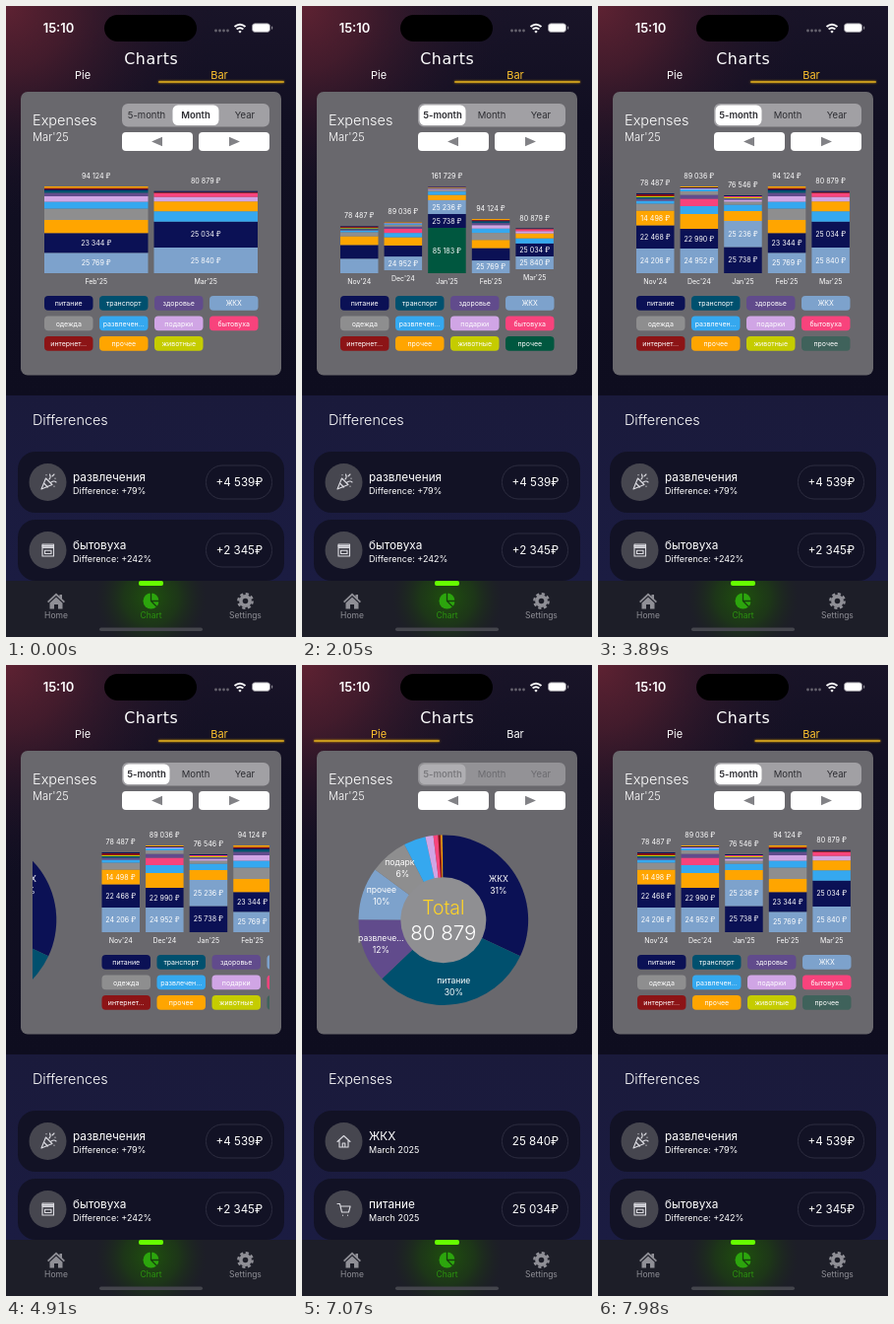
Animation of 295 by 640 pixels, one loop 8000 ms. Source, as an HTML page:

```html
<!DOCTYPE html>
<html lang="en">
<head>
<meta charset="utf-8">
<title>Charts</title>
<style>
  html, body { margin: 0; width: 100%; height: 100%; overflow: hidden; background: #110f22; }
  svg { display: block; width: 100%; height: 100%; }
  text { font-family: Inter, Roboto, sans-serif; fill: #fff; text-anchor: middle; }
  .start { text-anchor: start; }
  .wide { font-family: "DejaVu Sans", Inter, sans-serif; letter-spacing: .6px; }
  .light { font-weight: 300; }
  .line { fill: none; stroke: #dcdce2; stroke-width: 1.1; stroke-linecap: round; stroke-linejoin: round; }
</style>
</head>
<body>
<svg id="stage" viewBox="0 0 295 640">
  <defs>
    <linearGradient id="night" x1="0" y1="0" x2="0" y2="1">
      <stop offset="0" stop-color="#191428"/>
      <stop offset=".3" stop-color="#110f22"/>
      <stop offset="1" stop-color="#0e0d1f"/>
    </linearGradient>
    <radialGradient id="red" gradientUnits="userSpaceOnUse" cx="0" cy="0" r="215">
      <stop offset="0" stop-color="#5e2232"/>
      <stop offset=".3" stop-color="#4a1d2d" stop-opacity=".85"/>
      <stop offset=".6" stop-color="#331829" stop-opacity=".5"/>
      <stop offset="1" stop-color="#1a1226" stop-opacity="0"/>
    </radialGradient>
    <radialGradient id="glow" gradientUnits="userSpaceOnUse" cx="147.5" cy="600" r="56">
      <stop offset="0" stop-color="#1f5a08" stop-opacity=".85"/>
      <stop offset=".5" stop-color="#1d460e" stop-opacity=".6"/>
      <stop offset="1" stop-color="#1d2a18" stop-opacity="0"/>
    </radialGradient>
    <linearGradient id="panel" x1="0" y1="0" x2="0" y2="1">
      <stop offset="0" stop-color="#1a1a3b"/>
      <stop offset="1" stop-color="#1b1c42"/>
    </linearGradient>
    <filter id="blur" x="-10%" y="-400%" width="120%" height="900%"><feGaussianBlur stdDeviation="1.2"/></filter>
    <clipPath id="view"><rect x="27" y="150" width="241" height="220"/></clipPath>
  </defs>

  <rect width="295" height="640" fill="#110f22"/>
  <rect width="295" height="395" fill="url(#night)"/>
  <rect width="295" height="220" fill="url(#red)"/>

  <!-- status bar -->
  <rect x="100" y="9" width="94" height="27" rx="13.5"/>
  <g fill="#66636e">
    <circle cx="213.5" cy="25" r="1.4"/><circle cx="217.5" cy="25" r="1.4"/>
    <circle cx="221.5" cy="25" r="1.4"/><circle cx="225.5" cy="25" r="1.4"/>
  </g>
  <g fill="none" stroke="#fff" stroke-width="1.9">
    <path d="M232.5 21q5.5-4.6 11 0M234.6 23.6q3.4-2.7 6.8 0"/>
    <path d="M238 27.2l-1.2-1.4q1.2-.9 2.4 0z" fill="#fff" stroke-width=".8"/>
  </g>
  <rect x="250.5" y="17.8" width="18" height="8.6" rx="2.8" fill="#fff" stroke="#8d8b94" stroke-width=".8"/>
  <rect x="270" y="20.5" width="1.2" height="3.2" rx=".6" fill="#8d8b94"/>

  <g id="underline">
    <rect y="76" width="128" height="2" rx="1" fill="#b98500" filter="url(#blur)"/>
    <rect y="76.3" width="128" height="1.5" rx=".7" fill="#e0ae22"/>
  </g>

  <!-- chart card -->
  <rect x="15" y="87" width="265" height="287.5" rx="7" fill="#69686d"/>
  <g id="segmented">
    <rect x="118" y="99" width="150" height="23.5" rx="6" fill="#a1a0a4"/>
    <rect id="thumb" y="100.5" width="47" height="20.5" rx="5.5" fill="#fff"/>
    <g id="choices"></g>
  </g>
  <g fill="#fff">
    <rect x="118" y="128" width="72" height="19" rx="4"/>
    <rect x="196" y="128" width="72" height="19" rx="4"/>
  </g>
  <path d="M148 137.5l11-4.8v9.6zM238 137.5l-11-4.8v9.6z" fill="#828286"/>
  <g clip-path="url(#view)">
    <g id="barPage"></g>
    <g id="piePage"></g>
  </g>

  <!-- list -->
  <rect y="395" width="295" height="190" fill="url(#panel)"/>
  <g id="rows"></g>
  <g id="differences">
    <g class="line">
      <path d="M36 490l4.5-11 6.5 6.5zM38.5 484l4 4M44 480q2-2 .5-5M46 483q3-2 5 0M47 477l2-2M41 475.5v.2M50 479v.2M49 487v.2"/>
      <path d="M37 546h11.500v12H37zM37 549.500h11.500M39.500 552.300h6.500v3.200h-6.500z"/>
      <path d="M37.500 547.800h10.500" stroke-width="2"/>
    </g>
  </g>
  <g id="expenses">
    <g class="line">
      <path d="M36 483.500l6.500-6 6.500 6M38 482.500v6.500h9v-6.500M41.200 489v-4h2.600v4"/>
      <path d="M36 546.500h2.500l2 8.500h7l1.600-6H39.200M41.500 558v.3M46.500 558v.3"/>
    </g>
  </g>

  <!-- tab bar -->
  <rect y="583" width="295" height="57" fill="#1d1e28"/>
  <rect x="85" y="583" width="125" height="57" fill="url(#glow)"/>
  <rect x="135" y="583" width="25" height="5" rx="2" fill="#66ff00"/>
  <path d="M42 604l9-8.500 3.500 3.300V597h2.500v4.200l3 2.800-1.200 1.200L51 598l-7.800 7.200zM44.500 605.500l6.500-6 6.500 6v6h-4.500v-4.500h-4v4.500h-4.500z" fill="#8f8f96"/>
  <circle cx="147.500" cy="603.500" r="8" fill="#2ca50d"/>
  <path d="M147.500 595v8.500l6 6M147.500 603.500h9" fill="none" stroke="#17400c" stroke-width="1.300"/>
  <circle cx="243.500" cy="603.500" r="4.600" fill="none" stroke="#8f8f96" stroke-width="3.600"/>
  <circle cx="243.500" cy="603.500" r="7.200" fill="none" stroke="#8f8f96" stroke-width="2.400" stroke-dasharray="3.200 2.455"/>
  <rect x="95" y="630.500" width="105" height="3.500" rx="1.750" fill="#44454c"/>
</svg>

<script>
const $ = id => document.getElementById(id);
const stage = $('stage');

function add(parent, tag, attrs, content) {
  const node = document.createElementNS('http://www.w3.org/2000/svg', tag);
  set(node, attrs);
  if (content) node.textContent = content;
  return parent.appendChild(node);
}
function set(node, attrs) {
  for (const key in attrs) node.setAttribute(key, attrs[key]);
}
// y is the middle of the capital letters
const label = (parent, x, y, size, content, attrs = {}) =>
  add(parent, 'text', { x, y: y + size * .36, 'font-size': size, ...attrs }, content);

const clamp = v => Math.min(1, Math.max(0, v));
const mix = (a, b, p) => a + (b - a) * p;
const ramp = (t, from, to) => { const p = clamp((t - from) / (to - from)); return p * p * (3 - 2 * p); };
const money = v => String(v).replace(/(\d{3})$/, ' $1');
const left = { class: 'start' };
const heading = { class: 'start light' };

// fixed text
label(stage, 53.5, 22, 13, '15:10', { 'font-weight': 600 });
label(stage, 147.8, 53.5, 15.8, 'Charts', { class: 'wide' });
label(stage, 27, 116, 14.5, 'Expenses', heading);
label(stage, 27, 133, 11.2, "Mar'25", heading);
[['Home', 51, '#8f8f96'], ['Chart', 147.5, '#2b920f'], ['Settings', 243.5, '#8f8f96']]
  .forEach(([name, x, fill]) => label(stage, x, 618, 8.5, name, { style: `fill:${fill}` }));
const pieTab = label(stage, 78, 70.5, 11, 'Pie');
const barTab = label(stage, 217, 70.5, 11, 'Bar');
const choices = ['5-month', 'Month', 'Year'].map((name, i) =>
  label($('choices'), 143 + 50 * i, 111, 9.5, name, { style: 'fill:#2c2c31' }));

// list rows
for (const y of [452, 521]) {
  add($('rows'), 'rect', { x: 12, y, width: 271, height: 62, rx: 18, fill: '#121225' });
  add($('rows'), 'circle', { cx: 42.5, cy: y + 31, r: 19, fill: '#46464f' });
  add($('rows'), 'rect', { x: 203.5, y: y + 14, width: 67, height: 34, rx: 16.5, fill: 'none', stroke: '#2d2d40' });
}
function fillList(id, title, rows) {
  label($(id), 27, 420, 14.4, title, heading);
  rows.forEach(([name, note, amount], i) => {
    const y = 452 + 69 * i;
    label($(id), 68, y + 25.5, 11.8, name, left);
    label($(id), 68, y + 40, 9, note, left);
    label($(id), 237.5, y + 31, 11.6, amount);
  });
}
fillList('differences', 'Differences', [
  ['развлечения', 'Difference: +79%', '+4 539₽'], ['бытовуха', 'Difference: +242%', '+2 345₽']]);
fillList('expenses', 'Expenses', [
  ['ЖКХ', 'March 2025', '25 840₽'], ['питание', 'March 2025', '25 034₽']]);

// categories and legend
const colors = {
  navy: '#0b1155', teal: '#00506e', purple: '#614b8c', light: '#7da2cc',
  gray: '#8e8e8f', blue: '#35a8ef', lilac: '#d0a5e5', pink: '#f8437c',
  red: '#8c1416', orange: '#ffa500', lime: '#c5cc00', green: '#00573f'
};
const names = ['питание', 'транспорт', 'здоровье', 'ЖКХ', 'одежда', 'развлечен…',
  'подарки', 'бытовуха', 'интернет…', 'прочее', 'животные', 'прочее'];
const barPage = $('barPage');
const legend = Object.values(colors).map((fill, i) => {
  const group = add(barPage, 'g', {});
  const x = 39 + 56 * (i % 4), y = 294 + 20.5 * Math.floor(i / 4);
  const box = add(group, 'rect', { x, y, width: 49.5, height: 14.8, rx: 4, fill });
  label(group, x + 24.75, y + 7.5, 7, names[i]);
  return { group, box };
});

// parts run upwards: color, height, amount
const bars = [
  { name: "Nov'24", total: 78487, squeeze: .59, lift: 0, parts: [['light', 25, 24206], ['navy', 23.5, 22468],
    ['orange', 15, 14498], ['gray', 7], ['blue', 3], ['purple', 2], ['teal', 1.5], ['lime', 1], ['red', 2], ['navy', 1]] },
  { name: "Dec'24", total: 89036, squeeze: .557, lift: 3, parts: [['light', 25, 24952], ['navy', 20, 22990],
    ['orange', 15], ['blue', 8], ['pink', 7.5], ['purple', 4], ['gray', 3.5], ['blue', 2], ['lilac', 1], ['navy', 1], ['orange', 1]] },
  { name: "Jan'25", total: 76546, squeeze: .53, lift: 0, parts: [['green', 46, 85183], ['navy', 26.5, 25738], ['light', 26.5, 25236],
    ['orange', 10], ['blue', 6.5], ['gray', 3], ['lilac', 2], ['purple', 1.5], ['lime', 1], ['pink', 1], ['navy', 1]] },
  { name: "Feb'25", total: 94124, squeeze: .625, lift: 0, parts: [['light', 20.7, 25769], ['navy', 20, 23344],
    ['orange', 13.3], ['gray', 11.5], ['blue', 7], ['lilac', 5.5], ['purple', 3.5], ['teal', 2.5], ['navy', 1], ['red', 1.5], ['orange', 1.5]] },
  { name: "Mar'25", total: 80879, squeeze: .5, lift: 4, parts: [['light', 26, 25840], ['navy', 26.3, 25034],
    ['blue', 10.5], ['orange', 10], ['lilac', 4.5], ['pink', 4], ['red', 1], ['navy', 1]] }
];
for (const bar of bars) {
  bar.group = add(barPage, 'g', {});
  bar.rects = bar.parts.map(([color]) => add(bar.group, 'rect', { fill: colors[color] }));
  bar.tags = bar.parts.map(([, , amount]) => amount && label(bar.group, 0, 0, 7.1, money(amount) + ' ₽'));
  bar.sum = label(bar.group, 0, 0, 7.1, money(bar.total) + ' ₽');
  bar.axis = label(bar.group, 0, 0, 7, bar.name);
}

// wide: five months shown, solo: outlier hidden
function drawBars(wide, solo) {
  const small = wide * (1 - solo);
  bars.forEach((bar, i) => {
    const inMonth = i > 2;
    const x = mix(inMonth ? 39 + 111.5 * (i - 3) : 39 + 44.6 * i, 39 + 44.6 * i, wide);
    const width = mix(inMonth ? 105.5 : 38.5, 38.5, wide);
    const middle = x + width / 2;
    const scale = mix(1, bar.squeeze, small);
    const base = 271 - bar.lift * small;
    let y = base;
    set(bar.group, { opacity: inMonth ? 1 : wide });
    bar.parts.forEach(([color, size, amount], j) => {
      const height = size * (color === 'green' ? small : scale);
      y -= height;
      set(bar.rects[j], { x, y, width, height });
      if (amount) set(bar.tags[j], {
        x: middle, y: y + height / 2 + 2.6,
        opacity: color === 'green' ? small : amount > 24500 ? 1 : 1 - small
      });
    });
    set(bar.sum, { x: middle, y: y - 7.8 });
    set(bar.axis, { x: middle, y: base + 11.2 });
  });
  bars[2].sum.textContent = money(solo < .5 ? 161729 : 76546) + ' ₽';
  set(legend[11].group, { opacity: wide });
  set(legend[11].box, { 'fill-opacity': mix(1, .4, solo) });
}

// pie, centred on 0,0
const piePage = $('piePage');
const point = (share, r) => {
  const a = share * 2 * Math.PI;
  return `${(r * Math.sin(a)).toFixed(2)} ${(-r * Math.cos(a)).toFixed(2)}`;
};
let share = 0;
[['navy', .3195], ['teal', .629], ['purple', .751], ['light', .851], ['gray', .924], ['blue', .966],
  ['lilac', .981], ['pink', .99], ['red', .995], ['orange', .998], ['navy', 1]].forEach(([color, end]) => {
  add(piePage, 'path', { d: `M0 0L${point(share, 86.3)}A86.3 86.3 0 0 1 ${point(end, 86.3)}z`, fill: colors[color] });
  share = end;
});
add(piePage, 'circle', { r: 43.5, fill: '#8f8f92' });
[['ЖКХ', '31%', 56, -42], ['питание', '30%', 10.5, 61], ['развлече…', '12%', -63.5, 18.5],
  ['прочее', '10%', -63, -30.5], ['подарк', '6%', -44.5, -58.5]].forEach(([name, percent, x, y]) => {
  label(piePage, x, y, 8.6, name);
  label(piePage, x + (name === 'подарк' ? 3 : 0), y + 12, 8.6, percent);
});
label(piePage, 0, -12.2, 19.4, 'Total', { class: 'light', style: 'fill:#ffd426' });
label(piePage, 0, 13.3, 20.5, '80 879', { class: 'light' });

// page swipe: time, distance
const swipe = [[4640, 0], [4680, 4], [4790, 26], [4910, 58], [5030, 115], [5140, 166], [5250, 201], [5370, 220.5],
  [5470, 231], [5580, 236], [5800, 240], [6020, 241], [7040, 241], [7070, 237.5], [7180, 219], [7290, 180],
  [7400, 125], [7510, 74], [7620, 35], [7770, 10], [7880, 3], [7980, 1], [8000, 1]];
function swipeAt(t) {
  const i = swipe.findIndex(([time]) => time > t);
  if (i < 1) return swipe[0][1];
  const [[t0, a], [t1, b]] = [swipe[i - 1], swipe[i]];
  return mix(a, b, (t - t0) / (t1 - t0));
}
function spring(ms) {
  if (ms <= 0) return 0;
  const s = ms / 1000, decay = 9.17, speed = 8.59;
  return 1 - Math.exp(-decay * s) * (Math.cos(speed * s) + decay / speed * Math.sin(speed * s));
}

const toPie = 5050, toBar = 7570;
function draw(t) {
  const wide = ramp(t, 1450, 1850);
  drawBars(wide, ramp(t, 3520, 3890));
  choices.forEach((node, i) => set(node, { 'font-weight': i === (wide > .5 ? 0 : 1) ? 600 : 400 }));

  const offset = swipeAt(t);
  set(barPage, { transform: `translate(${offset} 0)` });
  set(piePage, { transform: `translate(${offset - 93.5} 258.7)` });

  const slide = spring(t - toPie) - spring(t - toBar);
  set($('underline'), { transform: `translate(${155 - 143 * slide} 0)` });

  const pie = ramp(t, toPie, toPie + 250) - ramp(t, toBar, toBar + 250);
  const tint = p => `fill:rgb(255,${mix(255, 196, p)},${mix(255, 45, p)})`;
  set(pieTab, { style: tint(pie) });
  set(barTab, { style: tint(1 - pie) });
  set($('segmented'), { opacity: mix(1, .75, pie) });
  set($('thumb'), { x: mix(169.5, 119.5, wide), opacity: mix(1, .4, pie) });
  set($('choices'), { opacity: mix(1, .45, pie) });
  set($('expenses'), { opacity: pie });
  set($('differences'), { opacity: 1 - pie });
}

const started = performance.now();
function tick() {
  draw((performance.now() - started) % 8000);
  requestAnimationFrame(tick);
}
tick();
</script>
</body>
</html>
```
